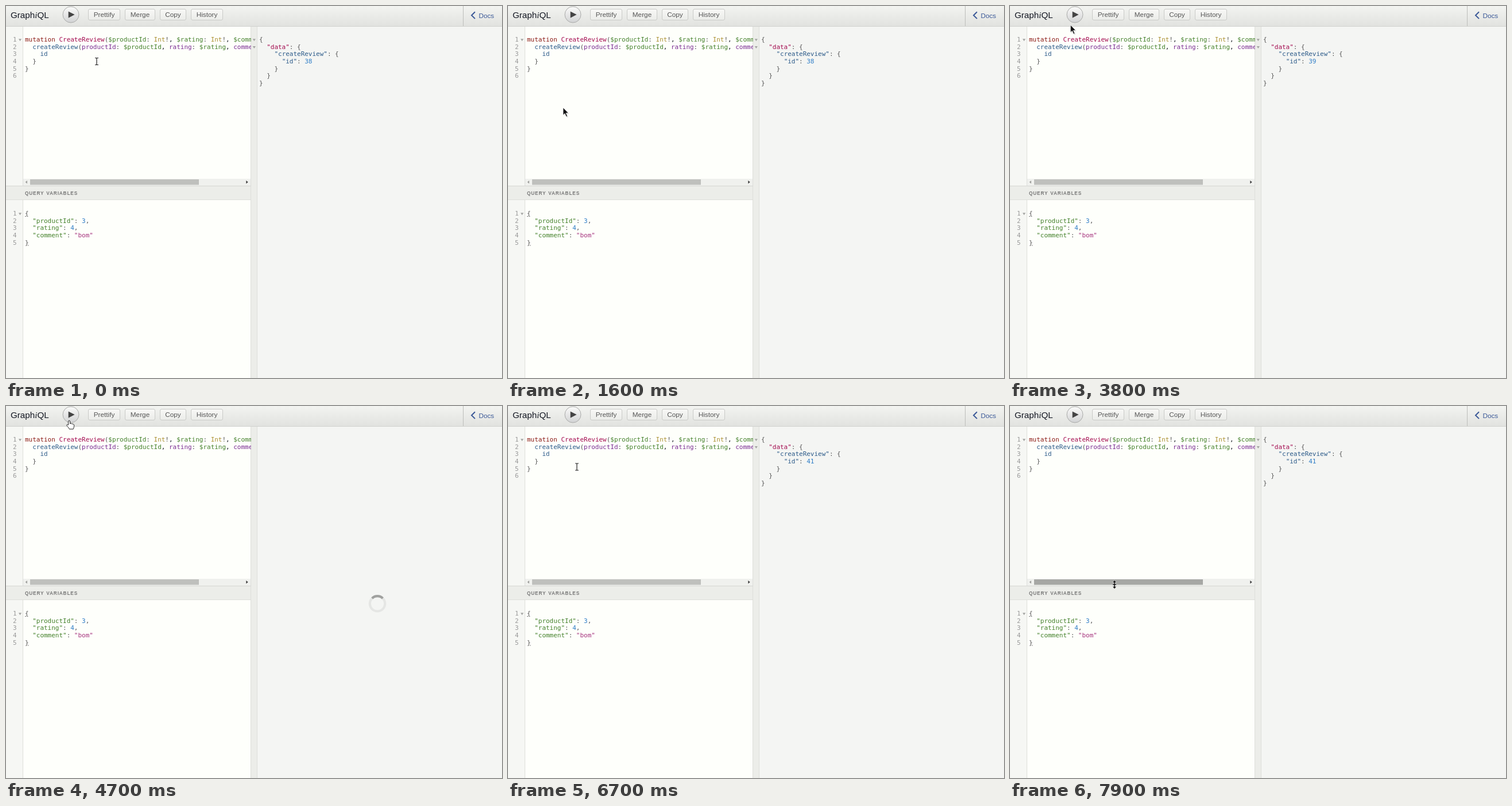
An HTML page for the animation above (8 s loop, 864 by 648 pixels).

```html
<!DOCTYPE html>
<html lang="en">
<head>
<meta charset="utf-8">
<title>GraphiQL</title>
<style>
  html, body { margin: 0; width: 864px; height: 648px; overflow: hidden; background: #fefffb; }
  svg, pre { position: absolute; left: 0; top: 0; }
  svg { font-family: "Liberation Sans", Arial, sans-serif; }
  pre {
    margin: 0; transform: scale(.84375); transform-origin: 0 0; color: #555;
    font: 13px/15px "DejaVu Sans Mono", monospace;
  }
  pre b { font-weight: normal; }
  .code { left: 32.8px; width: 467px; overflow: hidden; }
  .lines { left: 11.8px; color: #999; }
  .query { top: 52.3px; }
  .vars { top: 355.1px; }
  .result { left: 440.8px; top: 52.3px; }
  .k { color: #8b1a14; } .d { color: #a30a4e; } .p { color: #2b5a89; }
  .a { color: #7a2b92; } .v { color: #43802a; } .t { color: #ab9030; }
  .n { color: #2c7cc6; } .s { color: #a5307c; } .c { color: #141823; }
</style>
</head>
<body>
<svg width="864" height="648">
  <defs>
    <linearGradient id="bar" x2="0" y2="1"><stop stop-color="#f3f4f1"/><stop offset="1" stop-color="#e1e2df"/></linearGradient>
    <linearGradient id="btn" x2="0" y2="1"><stop stop-color="#f8f8f6"/><stop offset="1" stop-color="#ebece9"/></linearGradient>
    <linearGradient id="run" x2="0" y2="1"><stop stop-color="#fbfbfa"/><stop offset="1" stop-color="#d2d3d4"/></linearGradient>
    <linearGradient id="runDown" x2="0" y2="1"><stop stop-color="#dededd"/><stop offset="1" stop-color="#c3c3c3"/></linearGradient>
    <path id="fold" d="M-2.6-1.7H2.6L0 2.3Z" fill="#a5a6a3"/>
  </defs>

  <!-- panes -->
  <path fill="#f6f7f4" d="M0 36H29V313H0ZM0 338H29V648H0Z"/>
  <path fill="#f4f5f3" d="M438 36H864V648H438Z"/>
  <path fill="#ecede9" d="M427 36H437V648H427ZM0 314H427V338H0Z"/>
  <path fill="none" stroke="#dddeda" d="M29.5 36V313M29.5 338V648M426.5 36V648M437.5 36V648M0 337.5H427"/>
  <path stroke="#d6d7d3" d="M0 313.5H427"/>

  <!-- scrollbar -->
  <path fill="#f0f1ee" d="M30 301H426V313H30Z"/>
  <path id="thumb" d="M42 302H336V311.5H42Z"/>
  <path fill="#a0a19e" d="M37 304V309.4L33.6 306.7Z"/>
  <path fill="#3c3c3c" d="M418.3 304V309.4L421.7 306.7Z"/>
  <text x="33" y="329" font-size="8.27" font-weight="bold" letter-spacing=".84" word-spacing="1" fill="#777">QUERY VARIABLES</text>

  <!-- top bar -->
  <path fill="url(#bar)" d="M0 0H864V35H0Z"/>
  <path stroke="#d0d1ce" d="M0 35.5H864"/>
  <path stroke="#bcbdba" d="M796.5 0V35"/>
  <text x="8" y="20.5" font-size="15.2" fill="#141823">Graph<tspan font-family="Liberation Serif, serif" font-style="italic">i</tspan>QL</text>
  <circle id="runButton" cx="113" cy="15" r="14" stroke="#a9aaa8"/>
  <path fill="#444" d="M108.7 9.4 119.6 15 108.7 20.8Z"/>
  <g id="toolbar" font-size="11.81" text-anchor="middle"></g>
  <path fill="none" stroke="#3b5998" stroke-width="2" d="M817 10.3 811 16.2 817 22.1"/>
  <text x="823.4" y="20.5" font-size="11.81" fill="#3b5998">Docs</text>

  <use href="#fold" x="24.5" y="59"/>
  <use href="#fold" x="24.5" y="362"/>
  <g id="folds"><use href="#fold" x="432.3" y="59"/><use href="#fold" x="432.3" y="71.7"/></g>
  <g id="spinner" fill="none" stroke-width="4.2">
    <circle cx="647" cy="344.3" r="13.2" stroke="#e5e6e4"/>
    <path stroke="#a0a19f" d="M637.7 335A13.2 13.2 0 0 1 656.3 335"/>
  </g>
</svg>

<pre class="lines query">1
2
3
4
5
6</pre>
<pre class="lines vars">1
2
3
4
5</pre>
<pre class="code query"><b class="k">mutation</b> <b class="d">CreateReview</b>(<b class="v">$productId</b>: <b class="t">Int</b>!<b class="c">,</b> <b class="v">$rating</b>: <b class="t">Int</b>!<b class="c">,</b> <b class="v">$comment</b>
  <b class="p">createReview</b>(<b class="a">productId</b>: <b class="v">$productId</b><b class="c">,</b> <b class="a">rating</b>: <b class="v">$rating</b><b class="c">,</b> <b class="a">comment</b>
    <b class="p">id</b>
  }
}</pre>
<pre class="code vars"><u>{</u>
  <b class="v">"productId"</b>: <b class="n">3</b>,
  <b class="v">"rating"</b>: <b class="n">4</b>,
  <b class="v">"comment"</b>: <b class="s">"bom"</b>
<u>}</u></pre>
<pre class="result" id="result">{
  <b class="d">"data"</b>: {
    <b class="p">"createReview"</b>: {
      <b class="p">"id"</b>: <b class="n" id="reviewId"></b>
    }
  }
}</pre>

<svg width="864" height="648">
  <g id="cursor">
    <g id="arrow">
      <path fill="#0002" transform="translate(1.3 1.5)" d="M0 0V13L3 10.3 5.4 15.8 7.5 14.9 5.1 9.5H9.2Z"/>
      <path fill="#111" stroke="#fff" stroke-width=".7" d="M0 0V13L3 10.3 5.4 15.8 7.5 14.9 5.1 9.5H9.2Z"/>
    </g>
    <path id="beam" fill="none" stroke="#222" stroke-width="1.2" d="M-3-6H-1Q0-6 0-5Q0-6 1-6H3M0-5V5M-3 6H-1Q0 6 0 5Q0 6 1 6H3"/>
    <path id="hand" fill="#fff" stroke="#222" d="M3.6 8V2a1.5 1.5 0 0 1 3 0v4c.5-1 2.3-1 2.8.3 .8-.8 2.2-.3 2.4.7 1-.4 1.8.2 1.8 1.3 0 3-.4 4.4-1.4 6.9H5.3C4.3 12.6 2 10.8.8 8.9 .2 7.7 1.7 6.9 2.6 7.7Z"/>
    <path id="resize" fill="#111" stroke="#fff" stroke-width=".5" d="M0-7.5 3.5-3.5H1V-1H3.5V1H1V3.5H3.5L0 7.5-3.5 3.5H-1V1H-3.5V-1H-1V-3.5H-3.5Z"/>
  </g>
</svg>

<script>
const el = id => document.getElementById(id);
const show = (id, on) => { el(id).style.display = on ? "" : "none"; };

el("toolbar").innerHTML = [["Prettify", 143.5, 55], ["Merge", 207.5, 52], ["Copy", 268.5, 45], ["History", 322.5, 55]]
  .map(([label, x, w]) =>
    `<rect x="${x}" y="5.5" width="${w}" height="19" rx="2.5" fill="url(#btn)" stroke="#c9cac7"/>
     <text x="${x + w / 2}" y="18.6" fill="#555">${label}</text>`).join("");

const LOOP = 8000, STEP = 100;

// Pointer moves: first step, last step, x, y, shape
const moves = [
  [0, 0, 158, 96.5, "beam"],
  [200, 300, 158, 93.5, "beam"],
  [600, 700, 110, 125, "beam"],
  [800, 900, 17, 180, "arrow"],
  [1100, 1100, 17, 180, ""],
  [1400, 1400, 58, 187, "arrow"],
  [1500, 1600, 96, 177, "arrow"],
  [1700, 1700, 100, 150, "arrow"],
  [1800, 1900, 101, 85, "beam"],
  [2000, 2100, 98, 28, "arrow"],
  [2200, 2200, 94, 34, "arrow"],
  [2300, 2300, 99, 30, "arrow"],
  [2400, 2500, 108, 23, "hand"],
  [3200, 3400, 106, 24, "hand"],
  [3700, 3700, 105, 27, "hand"],
  [3800, 4000, 106, 45, "arrow"],
  [4100, 4200, 108, 32, "arrow"],
  [4300, 4300, 105, 25, "hand"],
  [6100, 6100, 103, 28, "hand"],
  [6200, 6300, 96, 50, "arrow"],
  [6400, 6700, 120, 106, "beam"],
  [6900, 7100, 262, 290, "arrow"],
  [7200, 7200, 273, 310, "arrow"],
  [7300, 7400, 250, 332, "arrow"],
  [7500, 7700, 181, 311, "arrow"],
  [7900, 7900, 182, 311, "resize"],
];

function pointerAt(t) {
  const i = moves.findLastIndex(m => m[0] <= t);
  const [start, end, x, y, shape] = moves[i];
  const [, , fromX, fromY] = moves[Math.max(0, i - 1)];
  const p = Math.min(1, (t - start + STEP) / (end - start + STEP));
  return { x: fromX + (x - fromX) * p, y: fromY + (y - fromY) * p, shape };
}

function draw() {
  const t = Math.floor(performance.now() % LOOP / STEP) * STEP;
  const within = (...spans) => spans.some(([from, to]) => t >= from && t < to);

  const pointer = pointerAt(t);
  el("cursor").setAttribute("transform", `translate(${pointer.x} ${pointer.y})`);
  for (const shape of ["arrow", "beam", "hand", "resize"]) show(shape, shape === pointer.shape);

  const pressed = within([2700, 2800], [4600, 4700], [5600, 5700]);
  const loading = within([4700, 5000], [5700, 6000]);
  el("runButton").setAttribute("fill", `url(#${pressed ? "runDown" : "run"})`);
  el("thumb").setAttribute("fill", t >= 7100 ? "#a6a7a4" : "#bfc0bd");
  show("spinner", loading);
  show("result", !loading);
  show("folds", !within([2800, 3200], [4700, 5100], [5700, 6100]));
  el("reviewId").textContent = 38 + [2800, 4700, 5700].filter(at => t >= at).length;

  requestAnimationFrame(draw);
}
draw();
</script>
</body>
</html>
```
